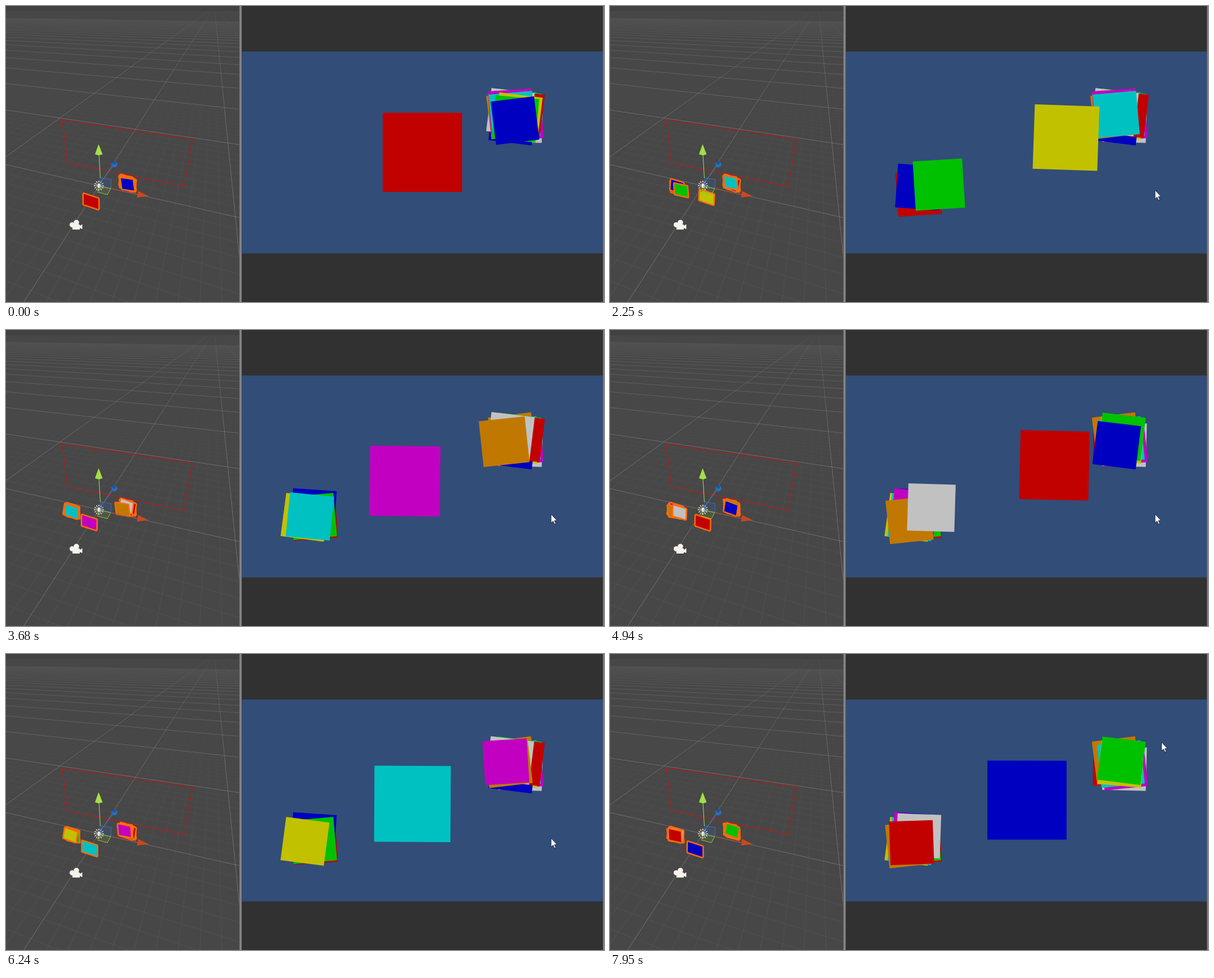
Animation of 1062x527 px, one loop 8 s. Source, as an HTML page with a canvas:

```html
<!DOCTYPE html>
<html lang="en">
<head>
<meta charset="utf-8">
<title>Card carousel</title>
<style>
  html, body { margin: 0; width: 100%; height: 100%; overflow: hidden; background: #313131; }
  canvas { position: absolute; left: 0; top: 0; display: block; }
</style>
</head>
<body>
<canvas id="back" width="1062" height="527"></canvas>
<canvas id="front" width="1062" height="527"></canvas>
<script>
const LOOP = 8000, RATE = 6, DEPTH = 0.82;
const CX = 739.5, CY = 260.5, HALF = 70.5;
const COLORS = ['#c10000', '#0000c1', '#00c100', '#c1c100', '#00c1c1', '#c100c1', '#c17800', '#c1c1c1'];

// Resting places on each pile: centre x, centre y, degrees
const RIGHT = [
  [905, 197, 0], [904, 204, -7], [905, 201, 5], [910, 197, 7], [899, 193, -5], [897.5, 188, -4],
  [896, 194, -7], [896, 189, 7], [914, 192, 7], [900, 205, 7], [908.5, 190, 7], [908, 196, 5],
  [907.5, 196, -6], [913, 200.5, -6], [899, 189.5, -7], [914, 204, 1.5], [897, 196, 1]
];
const LEFT = [
  [548, 334, -4], [546, 323, 4], [546, 332, -5], [531, 333.5, 7.5], [535.5, 333.5, 6],
  [540, 324, 6], [531, 339, -6], [548, 324, 2], [535, 336, -2]
];

// When the selected card changes: time, card
const STEPS = [
  [1080, 1], [1560, 2], [2038, 3], [2580, 4], [3120, 5], [3659, 6], [4150, 7], [4655, 8],
  [5197, 7], [5422, 6], [5583, 5], [5740, 4],
  [6347, 5], [6513, 6], [6675, 7], [6840, 8], [7005, 9]
];

const backCtx = document.getElementById('back').getContext('2d');
const g = document.getElementById('front').getContext('2d');

function line(c, x1, y1, x2, y2) {
  c.beginPath();
  c.moveTo(x1, y1);
  c.lineTo(x2, y2);
  c.stroke();
}

function trace(c, pts) {
  c.beginPath();
  pts.forEach(([x, y]) => c.lineTo(x, y));
  c.closePath();
}

function fillPoly(c, pts, color) {
  trace(c, pts);
  c.fillStyle = color;
  c.fill();
}

function strokePoly(c, pts, color, width = 1) {
  trace(c, pts);
  c.strokeStyle = color;
  c.lineWidth = width;
  c.stroke();
}

function disc(c, x, y, r, color) {
  c.beginPath();
  c.arc(x, y, r, 0, Math.PI * 2);
  c.fillStyle = color;
  c.fill();
}

function fade(c, stops) {
  const grad = c.createLinearGradient(0, 0, 0, 527);
  stops.forEach(([y, a]) => grad.addColorStop(y / 527, `rgba(165,165,165,${a})`));
  return grad;
}

// Ground lines run through points of the two axes to their vanishing points
function groundLine(c, n, origin, along, toward, k) {
  const w = 1 + k * n;
  if (w < 0.05) return;
  const x = (origin[0] + k * n * along[0]) / w;
  const y = (origin[1] + k * n * along[1]) / w;
  const far = 6;
  line(c, toward[0], toward[1], toward[0] + (x - toward[0]) * far, toward[1] + (y - toward[1]) * far);
}

function drawGround(c) {
  const origin = [165, 320], vx = [-1230, 2], vz = [370, 2];
  c.lineWidth = 1;
  c.strokeStyle = fade(c, [[0, 0], [130, 0.015], [260, 0.05], [527, 0.1]]);
  for (let i = -45; i <= 25; i++) {
    groundLine(c, i / 10, origin, vx, vz, -0.148);
    if (i < 20) groundLine(c, i / 10, origin, vz, vx, 0.463);
  }
  c.strokeStyle = fade(c, [[0, 0], [12, 0.06], [60, 0.2], [200, 0.36], [527, 0.36]]);
  for (let i = 0; i < 26; i++) groundLine(c, i, origin, vz, vx, 0.463);
  for (let i = -1; i <= 1; i++) groundLine(c, i, origin, vx, vz, -0.148);
  c.strokeStyle = fade(c, [[0, 0], [60, 0.12], [527, 0.2]]);
  for (let i = 2; i < 7; i++) groundLine(c, i, origin, vx, vz, -0.148);
}

function drawCameraIcon(c) {
  const color = '#f4f2ea';
  disc(c, 117.5, 389.5, 4.5, color);
  disc(c, 125, 385.5, 4.8, color);
  c.fillRect(118, 389, 13, 9);
  fillPoly(c, [[130, 392], [135.5, 388.5], [135.5, 397], [130, 395]], color);
}

function drawSun(c) {
  c.strokeStyle = '#f4eee6';
  c.lineWidth = 1.4;
  for (let i = 0; i < 12; i++) {
    const a = i * Math.PI / 6, x = Math.cos(a), y = Math.sin(a);
    line(c, 165 + x * 5.5, 320 + y * 5.5, 165 + x * 9, 320 + y * 9);
  }
  disc(c, 165, 320, 4, '#fffaf5');
}

function drawBack(c) {
  c.fillStyle = '#313131';
  c.fillRect(0, 0, 1062, 527);
  c.save();
  c.beginPath();
  c.rect(0, 0, 415, 527);
  c.clip();
  c.fillStyle = '#474747';
  c.fillRect(0, 0, 415, 527);
  c.fillStyle = '#414141';
  c.fillRect(0, 0, 415, 9);
  drawGround(c);
  c.setLineDash([6, 3]);
  strokePoly(c, [[100, 203], [331, 237], [316.5, 321], [109, 279]], '#f00000', 1.2);
  c.setLineDash([]);
  drawCameraIcon(c);
  drawSun(c);
  c.restore();
  c.fillStyle = '#5c5c5c';
  c.fillRect(414, 0, 5, 527);
  c.fillStyle = '#858585';
  c.fillRect(415, 0, 3, 527);
  c.fillStyle = '#324d78';
  c.fillRect(419, 81, 641, 359.5);
  c.fillStyle = '#777';
  c.fillRect(1060, 0, 2, 527);
}

// World target of a card: x, y, depth, angle
function target(i, current) {
  if (i === current) return [0, 0, 0, 0];
  const onRight = i > current;
  const [x, y, deg] = (onRight ? RIGHT : LEFT)[i];
  const s = 1 + DEPTH;
  return [(x - CX) * s, (y - CY) * s, 1 + (onRight ? i : -i) * 0.0002, deg * Math.PI / 180];
}

function cardAt(i, t) {
  let goal = target(i, 0), from = goal, start = 0;
  const ease = (end) => {
    const k = Math.exp(-RATE * (end - start) / 1000);
    return goal.map((v, n) => v + (from[n] - v) * k);
  };
  for (const [time, current] of STEPS) {
    if (time > t) break;
    from = ease(time);
    start = time;
    goal = target(i, current);
  }
  return { i, pose: ease(t) };
}

function corners([x, y, z, a], project) {
  const c = Math.cos(a) * HALF, s = Math.sin(a) * HALF;
  return [[-1, -1], [1, -1], [1, 1], [-1, 1]].map(([u, v]) =>
    project(x + u * c - v * s, y + u * s + v * c, z));
}

const mix = (a, b, k) => a + (b - a) * k;

function gameView(x, y, z) {
  const s = 1 + DEPTH * z;
  return [CX + x / s, CY + y / s];
}

function sceneView(x, y, z) {
  return [
    mix(151, 171, z) + x * mix(0.184, 0.1495, z),
    mix(348, 319.5, z) + x * mix(0.06, 0.038, z) + y * 0.13
  ];
}

function drawHandles() {
  g.lineWidth = 1;
  fillPoly(g, [[168, 306], [187, 309], [186, 325], [167, 321]], 'rgba(60,110,200,.15)');
  strokePoly(g, [[168, 306], [187, 309], [186, 325], [167, 321]], '#3a6cc0');
  fillPoly(g, [[166, 321], [186, 325], [180, 336], [162, 331]], 'rgba(150,210,60,.12)');
  strokePoly(g, [[166, 321], [186, 325], [180, 336], [162, 331]], '#93c83f');
  g.strokeStyle = '#a03c28';
  line(g, 162, 331, 163, 312);
  g.strokeStyle = '#a5e05a';
  line(g, 167.5, 306, 165, 264);
  g.strokeStyle = '#3c7ccc';
  line(g, 169, 313, 190, 285);
  g.strokeStyle = '#c2492a';
  line(g, 186, 325, 234, 336);
  fillPoly(g, [[164.5, 246], [171.5, 264], [165, 266], [158, 264]], '#a3e048');
  disc(g, 192.5, 282, 5.3, '#2b6fbd');
  disc(g, 192, 279.5, 3, '#1f5596');
  fillPoly(g, [[234.5, 329.5], [253.5, 338.5], [232.5, 341]], '#c9481f');
}

function cursorAt(t) {
  const move = (a, b, t0, t1) => {
    const k = Math.min(1, Math.max(0, (t - t0) / (t1 - t0)));
    const e = k * k * (3 - 2 * k);
    return [mix(a[0], b[0], e), mix(a[1], b[1], e)];
  };
  if (t < 130) return null;
  return t < 1000
    ? move([978, 503], [968, 328], 110, 310)
    : move([968, 328], [979.5, 157], 7200, 7650);
}

function drawCursor([x, y]) {
  const shape = [[0, 0], [0, 15.5], [3.6, 12.2], [6, 17.8], [8.3, 16.8], [6, 11.3], [10.6, 11.3]];
  const pts = shape.map(([u, v]) => [x + u, y + v]);
  fillPoly(g, pts, '#fff');
  strokePoly(g, pts, '#182338', 0.9);
}

function draw(t) {
  g.clearRect(0, 0, 1062, 527);
  const cards = RIGHT.map((_, i) => cardAt(i, t)).sort((a, b) => b.pose[2] - a.pose[2]);
  g.lineJoin = 'round';
  for (const { i, pose } of cards) {
    const color = COLORS[i % COLORS.length];
    const small = corners(pose, sceneView);
    strokePoly(g, small, '#ff6a0a', 5);
    fillPoly(g, small, color);
    fillPoly(g, corners(pose, gameView), color);
  }
  drawHandles();
  const cursor = cursorAt(t);
  if (cursor) drawCursor(cursor);
}

drawBack(backCtx);
const begin = performance.now();
function tick(now) {
  draw(Math.max(0, now - begin) % LOOP);
  requestAnimationFrame(tick);
}
draw(0);
requestAnimationFrame(tick);
</script>
</body>
</html>
```
